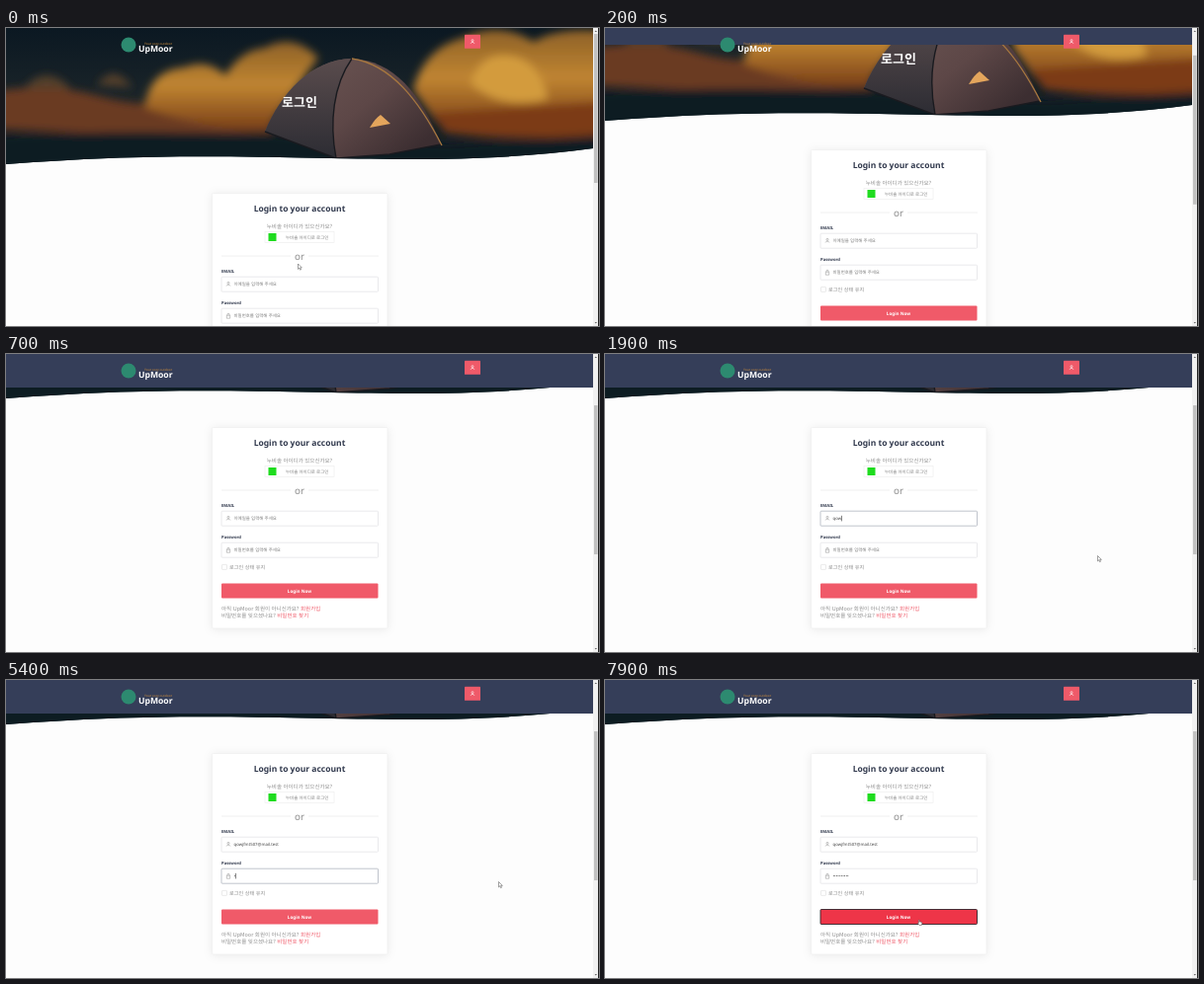
Write an HTML page that moves like this. It is 600 by 302 pixels and loops after 8000 ms.

```html
<!DOCTYPE html>
<html lang="ko">
<head>
<meta charset="utf-8">
<title>Login</title>
<style>
  html, body { margin: 0; width: 100%; height: 100%; overflow: hidden; background: #fdfdfd; }
  svg { display: block; width: 600px; height: 302px; }
  text {
    font-family: "Noto Sans", "Noto Sans CJK KR", "Noto Sans CJK", sans-serif;
    text-rendering: geometricPrecision;
    fill: #8c8c8c;
  }
  .ko { font-family: "Noto Sans CJK KR", "Noto Sans CJK", "Noto Sans", sans-serif; }
  .mid { text-anchor: middle; }
  .bold { font-weight: 700; }
  .dark { fill: #323a4e; }
  .white { fill: #fff; }
  .link { fill: #ef5a69; }
  .small { font-size: 4.45px; fill: #7c7c7c; }
  .body { font-size: 5.5px; }
  .label { font-size: 4.2px; }
  .typed { font-size: 4.3px; fill: #444; }
  .field { fill: #fff; stroke: #e5e5e8; stroke-width: .8; }
  .field.focus { stroke: #b0b5bf; }
  .icon { fill: none; stroke: #888; stroke-width: .5; }
  .card { fill: #fff; stroke: #eee; stroke-width: .7; filter: drop-shadow(0 1px 5px rgba(0, 0, 0, .08)); }
</style>
</head>
<body>
<svg viewBox="0 0 600 302">
  <defs>
    <clipPath id="heroShape"><path d="M0 0H594V122C500 134.500 420 134 300 131.500S110 130 0 138Z"/></clipPath>
    <linearGradient id="sky" x2="0" y2="1">
      <stop offset="0" stop-color="#0b1822"/>
      <stop offset=".5" stop-color="#1a2429"/>
      <stop offset="1" stop-color="#0e1a23"/>
    </linearGradient>
    <linearGradient id="bush" x2="0" y2="1">
      <stop offset="0" stop-color="#8d6128"/>
      <stop offset=".5" stop-color="#c08531"/>
      <stop offset="1" stop-color="#7a4019"/>
    </linearGradient>
    <linearGradient id="tent" x2="1" y2=".7">
      <stop offset="0" stop-color="#6f5a57"/>
      <stop offset=".6" stop-color="#5d4747"/>
      <stop offset="1" stop-color="#3c2e31"/>
    </linearGradient>
    <linearGradient id="tentSide" x2="0" y2="1">
      <stop offset="0" stop-color="#5a4c4d"/>
      <stop offset="1" stop-color="#2c2c33"/>
    </linearGradient>
    <filter id="soft" x="-30%" y="-30%" width="160%" height="160%"><feGaussianBlur stdDeviation="4.5"/></filter>
    <path id="person" d="M-1.9 2.2C-1.5 .3 1.5 .3 1.9 2.2M-1 -.9a1 1.1 0 1 0 2 0a1 1.1 0 1 0 -2 0"/>
  </defs>

  <rect width="600" height="302" fill="#fdfdfd"/>

  <g id="page">
    <g clip-path="url(#heroShape)">
      <rect width="594" height="140" fill="url(#sky)"/>
      <g filter="url(#soft)">
        <path d="M-20 66Q40 54 90 68T170 74L270 88V106L120 108L-20 102Z" fill="#6a3a20"/>
        <path d="M18 62Q40 34 66 62ZM92 58Q108 34 128 60Z" fill="#54402a"/>
        <path d="M140 80Q146 42 180 40Q204 30 222 48Q238 22 262 20Q290 4 316 30L290 66L264 102Q200 104 140 80Z" fill="url(#bush)"/>
        <path d="M412 62Q424 20 462 10Q500 -8 534 14Q560 -2 610 4V96Q500 104 436 96Z" fill="url(#bush)"/>
        <path d="M470 56Q480 24 510 28T548 72Q500 84 470 56Z" fill="#d39b3c"/>
        <path d="M432 86L610 74V108Q520 116 444 106Z" fill="#7c3a18"/>
        <path d="M-20 110Q120 102 262 108L444 118L610 110V150H-20Z" fill="#0d1a23"/>
      </g>
      <path d="M262 105C278 66 309 32 350 31C392 33 420 66 440 118L388 128L334 132Z" fill="url(#tent)"/>
      <path d="M262 105C278 66 309 32 350 31C331 58 327 96 334 132Z" fill="url(#tentSide)"/>
      <path d="M350 31C331 58 327 96 334 132M262 105L334 132L388 128L440 118" fill="none" stroke="#191a1f" stroke-width="1.4"/>
      <path d="M350 31C390 37 418 74 441 119" fill="none" stroke="#a5763f" stroke-width="1.4"/>
      <path d="M368 101Q374 91 379 88L389 97Z" fill="#e3a55c"/>
    </g>
    <text class="ko bold white mid" x="297" y="80" font-size="13">로그인</text>

    <rect class="card" x="208.5" y="167.5" width="177.5" height="203.5" rx="1"/>
    <text class="bold dark mid" x="297" y="186" font-size="8.5">Login to your account</text>
    <text class="ko body mid" x="297" y="202.6">누비솔 아이디가 있으신가요?</text>
    <rect x="262" y="206.5" width="70" height="11" fill="#fff" stroke="#eee" stroke-width=".7"/>
    <rect x="265.5" y="208" width="8" height="8" fill="#1fdc1f"/>
    <text class="ko small" x="283" y="213.8">누비솔 아이디로 로그인</text>
    <path d="M218 231H288M306 231H377" stroke="#ececec" stroke-width=".8"/>
    <text class="mid" x="297" y="234.8" font-size="9.8">or</text>

    <text class="bold dark label" x="218" y="247.6">EMAIL</text>
    <rect id="emailBox" class="field" x="218" y="252.2" width="158.5" height="15" rx=".8"/>
    <use href="#person" class="icon" x="225" y="259.3"/>
    <text id="emailHint" class="ko small" x="230.5" y="261.3">이메일을 입력해 주세요</text>
    <text id="email" class="typed" x="230.5" y="261.2"></text>

    <text class="bold dark label" x="218" y="279.5">Password</text>
    <rect id="passBox" class="field" x="218" y="284.2" width="158.5" height="15" rx=".8"/>
    <path class="icon" d="M223.3 291.2h3.4v3h-3.4zM224 291.2v-1a1 1 0 0 1 2 0v1"/>
    <text id="passHint" class="ko small" x="230.5" y="293.3">비밀번호를 입력해 주세요</text>
    <text id="pass" class="typed" x="230.5" y="293.4"></text>
    <rect id="caret" width=".6" height="5.6" fill="#333"/>

    <rect x="218.5" y="306.4" width="5" height="5" rx=".6" fill="#fff" stroke="#dcdcdc" stroke-width=".6"/>
    <text class="ko" x="226" y="311" font-size="5.2">로그인 상태 유지</text>
    <rect id="button" x="218" y="325.5" width="158.5" height="15" rx="1"/>
    <text class="bold white mid" x="297" y="334.7" font-size="4.6">Login Now</text>
    <text class="ko body" x="218" y="352.5">아직 UpMoor 회원이 아니신가요? <tspan class="link">회원가입</tspan></text>
    <text class="ko body" x="218" y="360.1">비밀번호를 잊으셨나요? <tspan class="link">비밀번호 찾기</tspan></text>
  </g>

  <rect id="bar" width="594" fill="#353e59"/>
  <circle cx="124" cy="17" r="7.5" fill="#2d8a70"/>
  <text x="140" y="16.6" font-size="3.3" style="fill:#c98a3c">Your cozy outdoor</text>
  <text class="bold white" x="134" y="23.6" font-size="8.6">UpMoor</text>
  <rect x="464" y="6.8" width="16" height="14" rx=".6" fill="#ef5a69"/>
  <use href="#person" x="472" y="13.6" fill="none" stroke="#fff" stroke-width=".6"/>

  <rect x="594" width="6" height="302" fill="#f1f1f1"/>
  <rect id="thumb" x="595" width="3.6" height="151" fill="#c1c1c1"/>
  <path d="M595.6 4L596.8 2.4L598 4ZM595.6 298L596.8 299.6L598 298Z" fill="#666"/>
  <rect x="599" width="1" height="302" fill="#222"/>

  <g id="mouse" fill="#fff" stroke="#444" stroke-width=".5" stroke-linejoin="round">
    <path id="arrow" d="M0 0V5.4L1.2 4.3L2.1 6.2L3 5.8L2.1 3.9H3.8Z"/>
    <path id="hand" d="M.4 .4Q.9 -.3 1.3 .4V2L3.3 2.4Q4 2.6 3.8 3.5L3.3 5.6H1L-.6 3.4Q-.5 2.8 .4 3.3Z"/>
  </g>
</svg>
<script>
const LOOP = 8000, STEP = 100;
const ADDRESS = "qowjfmt507@mail.test";
const EMAIL_KEYS = [1700, 1800, 1900, 2000, 2100, 2200, 2300, 2500, 3000, 3200, 3400,
  3700, 3800, 3900, 4000, 4200, 4400, 4500, 4600, 4700];
const PASS_KEYS = [5300, 5500, 5600, 5800, 5900, 6000, 6100, 6300, 6600, 6700];
const EMAIL_FOCUS = 1400, PASS_FOCUS = 5000, CLICK = 7800;

const SCROLL = [[0, 0], [100, 15], [200, 44], [300, 70], [400, 86.8], [500, 91], [600, 92.5], [700, 93]];
const BAR = [[100, 0], [200, 17], [300, 29], [400, 34]];
const MOUSE_X = [[900, 295.5], [1200, 290], [1400, 292], [1600, 498.5], [7000, 498.5], [7600, 317]];
const MOUSE_Y = [[900, 239], [1200, 166], [1400, 168], [1600, 204.5], [7000, 204.5], [7600, 243]];

const $ = id => document.getElementById(id);
const show = (el, on) => el.setAttribute("visibility", on ? "visible" : "hidden");
const set = (el, attrs) => { for (const k in attrs) el.setAttribute(k, attrs[k]); };

function track(keys, t) {
  if (t <= keys[0][0]) return keys[0][1];
  for (let i = 1; i < keys.length; i++) {
    const [t0, a] = keys[i - 1], [t1, b] = keys[i];
    if (t <= t1) return a + (b - a) * (t - t0) / (t1 - t0);
  }
  return keys[keys.length - 1][1];
}

const pressed = (keys, t) => keys.filter(k => k <= t);

function fill(id, text, focused) {
  $(id).textContent = text;
  show($(id + "Hint"), !text);
  $(id + "Box").classList.toggle("focus", focused);
}

function drawForm(t) {
  const emailKeys = pressed(EMAIL_KEYS, t), passKeys = pressed(PASS_KEYS, t);
  const inEmail = t >= EMAIL_FOCUS && t < PASS_FOCUS;
  const inPass = t >= PASS_FOCUS && t < CLICK;
  fill("email", ADDRESS.slice(0, emailKeys.length), inEmail);
  fill("pass", "•".repeat(passKeys.length), inPass);

  const active = inPass ? $("pass") : $("email");
  const last = Math.max(...(inPass ? [PASS_FOCUS, ...passKeys] : [EMAIL_FOCUS, ...emailKeys]));
  const width = active.textContent ? active.getComputedTextLength() : 0;
  set($("caret"), { x: 230.7 + width, y: inPass ? 288.8 : 256.8 });
  show($("caret"), (inEmail || inPass) && (t - last) % 1060 < 530);
}

function drawMouse(t) {
  const x = track(MOUSE_X, t), y = track(MOUSE_Y, t);
  const over = t > 7000 && y > 232.5 && x < 376;
  $("mouse").setAttribute("transform", `translate(${x} ${y})`);
  show($("mouse"), t < STEP || t >= 1000);
  $("arrow").style.display = over ? "none" : "";
  $("hand").style.display = over ? "" : "none";
  set($("button"), {
    fill: over ? "#ee3548" : "#f05a69",
    stroke: t >= CLICK ? "#33222a" : "none",
    "stroke-width": .9
  });
}

function draw(time) {
  const t = Math.floor((time % LOOP + .5) / STEP) * STEP;
  const scroll = track(SCROLL, t);
  $("page").setAttribute("transform", `translate(0 ${-scroll})`);
  $("bar").setAttribute("height", track(BAR, t));
  $("thumb").setAttribute("y", 6 + scroll * .495);
  drawForm(t);
  drawMouse(t);
}

const start = performance.now();
function tick() {
  draw(performance.now() - start);
  requestAnimationFrame(tick);
}
tick();
</script>
</body>
</html>
```
